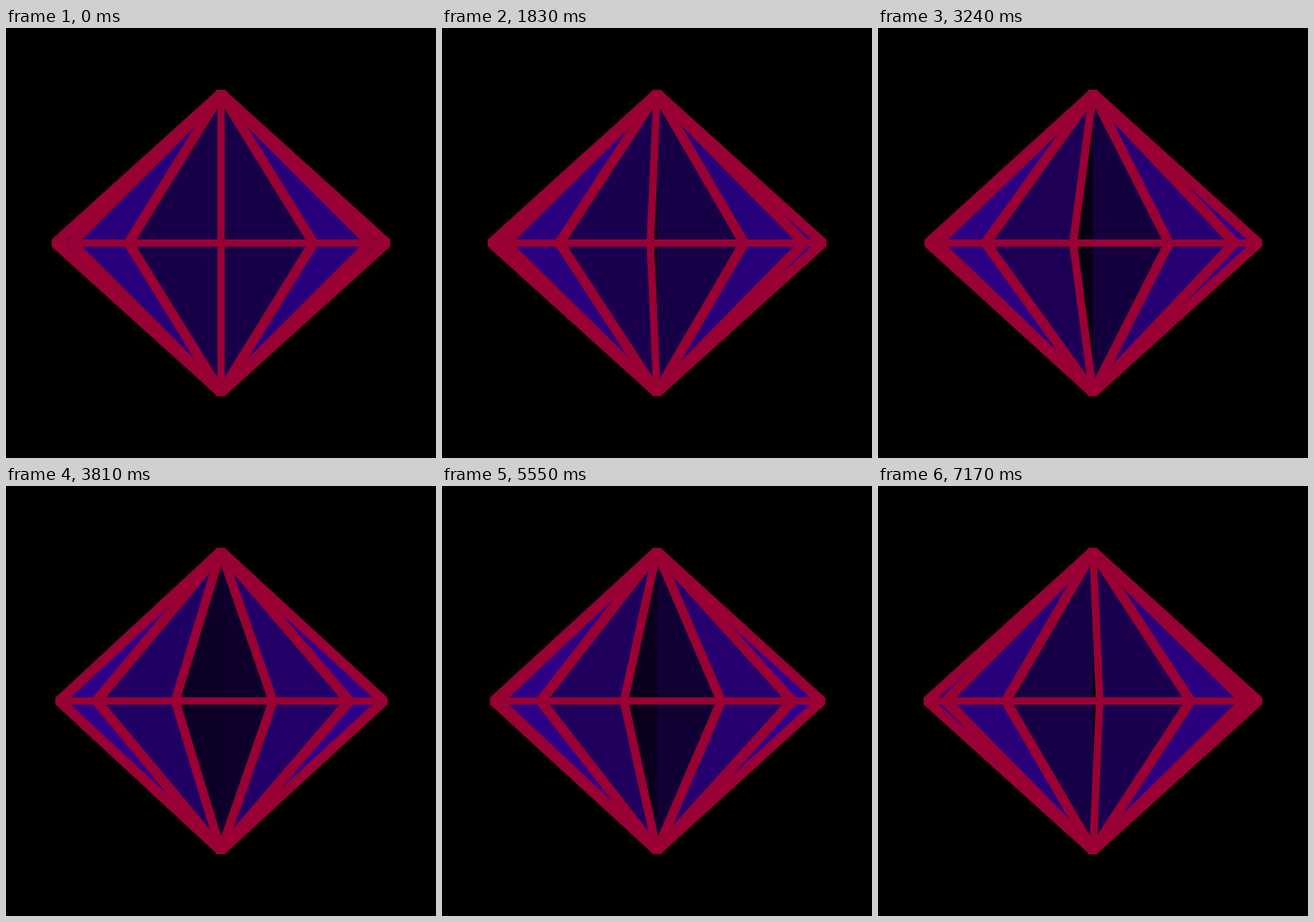
These frames come from a looping animation (480x480 px, 7200 ms). An HTML page with a canvas:

```html
<!DOCTYPE html>
<html>
<head>
<meta charset="utf-8">
<style>
  html, body { margin: 0; width: 100%; height: 100%; overflow: hidden; background: #000; }
  canvas { display: block; }
</style>
</head>
<body>
<canvas id="stage" width="480" height="480"></canvas>
<script>
const ctx = document.getElementById('stage').getContext('2d');
const C = 240, RADIUS = 185, HEIGHT = 167, FINS = 12, PEN = 4;
const STEP = 30, LOOP = 7200;
const TOP = [C, C - HEIGHT], BOTTOM = [C, C + HEIGHT];
const start = performance.now();

function polygon(points, color) {
  ctx.beginPath();
  for (const [x, y] of points) ctx.lineTo(x, y);
  ctx.closePath();
  ctx.fillStyle = color;
  ctx.fill();
}

// Line swept by a square pen, so slanted lines come out thicker
function line([x1, y1], [x2, y2]) {
  const px = x2 < x1 ? -PEN : PEN, py = y2 < y1 ? -PEN : PEN;
  polygon([
    [x1 - px, y1 - py], [x1 + px, y1 - py], [x2 + px, y2 - py],
    [x2 + px, y2 + py], [x2 - px, y2 + py], [x1 - px, y1 + py]
  ], '#990033');
}

function draw(now) {
  const frame = Math.floor((now - start) % LOOP / STEP);
  ctx.fillStyle = '#000';
  ctx.fillRect(0, 0, 480, 480);

  const fins = Array.from({ length: FINS }, (_, i) => {
    const a = (i * 360 / FINS - frame * 2) * Math.PI / 180;
    const sin = Math.sin(a), depth = Math.cos(a);
    const scale = 1 + 0.02 * depth + 0.13 * depth * depth;
    return { x: C + RADIUS * sin * scale, depth, shade: 0.03 + 0.9 * Math.abs(sin) };
  }).sort((a, b) => a.depth - b.depth);

  for (const { x, shade } of fins) {
    const corner = [x, C];
    polygon([TOP, corner, BOTTOM], `rgb(${51 * shade}, 0, ${153 * shade})`);
    line(TOP, corner);
    line(corner, BOTTOM);
  }

  const xs = fins.map(f => f.x);
  line([Math.min(...xs), C], [Math.max(...xs), C]);
}

function tick() {
  draw(performance.now());
  requestAnimationFrame(tick);
}
tick();
</script>
</body>
</html>
```
